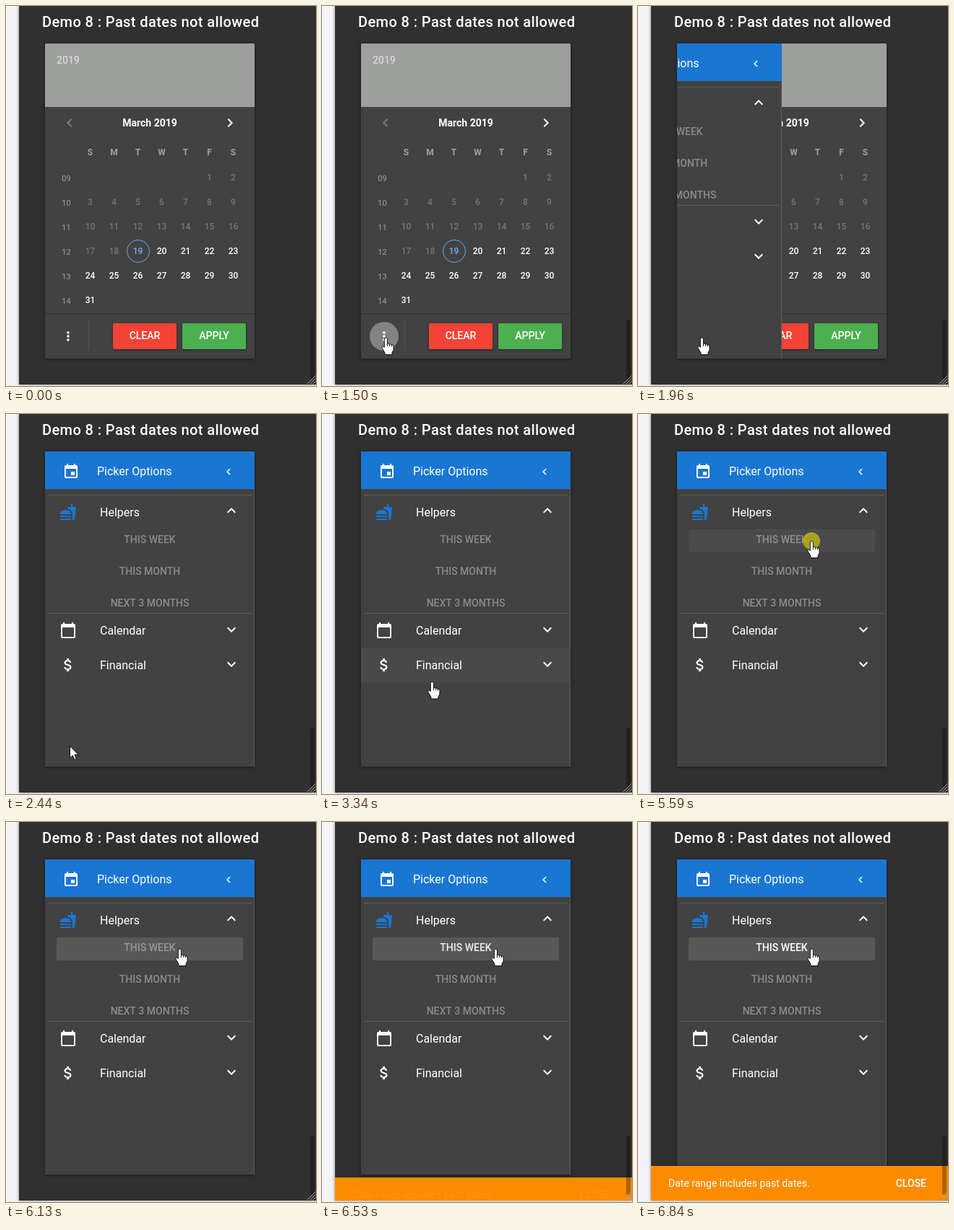
An HTML page with a canvas for the animation above (8 s loop, 429 by 527 pixels).

```html
<!DOCTYPE html>
<html lang="en">
<head>
<meta charset="utf-8">
<title>Date picker demo</title>
<style>
  html, body { margin: 0; width: 100%; height: 100%; overflow: hidden; background: #f4f4f7; }
  canvas { display: block; }
</style>
</head>
<body>
<canvas id="stage" width="429" height="527"></canvas>
<script>
const ctx = document.getElementById('stage').getContext('2d');
const LOOP = 8000;
const CARD = '#424242';

const icons = {
  left: 'M15.41 16.59L10.83 12l4.58-4.59L14 6l-6 6 6 6z',
  right: 'M8.59 16.59L13.17 12 8.59 7.41 10 6l6 6-6 6z',
  up: 'M12 8l-6 6 1.41 1.41L12 10.83l4.59 4.58L18 14z',
  down: 'M16.59 8.59L12 13.17 7.41 8.59 6 10l6 6 6-6z',
  event: 'M17 12h-5v5h5zM16 1v2H8V1H6v2H5a2 2 0 0 0-2 2v14a2 2 0 0 0 2 2h14a2 2 0 0 0 2-2V5a2 2 0 0 0-2-2h-1V1zm3 18H5V8h14z',
  calendar: 'M20 3h-1V1h-2v2H7V1H5v2H4a2 2 0 0 0-2 2v16a2 2 0 0 0 2 2h16a2 2 0 0 0 2-2V5a2 2 0 0 0-2-2zm0 18H4V8h16z',
  food: 'M18.06 23h1.66c.84 0 1.53-.64 1.63-1.46L23 5.05h-5V1h-1.97v4.05h-4.97l.3 2.34c1.71.47 3.31 1.32 4.27 2.26 1.44 1.42 2.43 2.89 2.43 5.29zM1 22v-1h15.03v1a1 1 0 0 1-1 1H2a1 1 0 0 1-1-1zm15.03-7C16.03 7 1 7 1 15zM1 17h15v2H1z',
  dollar: 'M11.8 10.9c-2.27-.59-3-1.2-3-2.15 0-1.09 1.01-1.85 2.7-1.85 1.78 0 2.44.85 2.5 2.1h2.21c-.07-1.72-1.12-3.3-3.21-3.81V3h-3v2.16c-1.94.42-3.5 1.68-3.5 3.61 0 2.31 1.91 3.46 4.7 4.13 2.5.6 3 1.48 3 2.41 0 .69-.49 1.79-2.7 1.79-2.06 0-2.87-.92-2.98-2.1h-2.2c.12 2.19 1.76 3.42 3.68 3.83V21h3v-2.15c1.95-.37 3.5-1.5 3.5-3.55 0-2.84-2.43-3.81-4.7-4.4z'
};
for (const name in icons) icons[name] = new Path2D(icons[name]);

const arrow = new Path2D('M.5 .5V17L4.2 13.5 6.7 19.4 9.3 18.3 6.8 12.5H12Z');
const hand = new Path2D('M-1.7 2Q-1.7 0 .3 0 2.4 0 2.4 2V8.5Q4 7.5 5.4 9 7 8.2 8.2 9.8 11 9.3 11 12V17L9 20.5V23.5H-1V21L-4.8 14.5Q-5.8 12.5-4.5 12-3.3 11.5-1.7 13.5Z');
const knuckles = new Path2D('M2.4 8.5V12M5.4 9V12M8.2 9.8V12.5');

const white = alpha => `rgba(255,255,255,${alpha})`;
const lerp = (a, b, p) => a + (b - a) * p;

// Progress that advances in `count` equal jumps, the first at `from` and the last at `to`.
function stepped(t, from, to, count) {
  if (t < from) return 0;
  const step = Math.floor((t - from) / (to - from) * (count - 1) + 0.12);
  return Math.min(1, (step + 1) / count);
}

function rect(x, y, w, h, color, radius = 0) {
  ctx.fillStyle = color;
  ctx.beginPath();
  ctx.roundRect(x, y, w, h, radius);
  ctx.fill();
}

function circle(x, y, r, color) {
  ctx.fillStyle = color;
  ctx.beginPath();
  ctx.arc(x, y, r, 0, 2 * Math.PI);
  ctx.fill();
}

function text(str, x, y, size, { weight = 400, color = '#fff', align = 'left', spacing = 0 } = {}) {
  ctx.font = `${weight} ${size}px Roboto, sans-serif`;
  ctx.letterSpacing = spacing + 'px';
  ctx.textAlign = align;
  ctx.fillStyle = color;
  ctx.fillText(str, x, y);
}

function icon(name, x, y, color = '#fff', size = 24) {
  ctx.save();
  ctx.translate(x - size / 2, y - size / 2);
  ctx.scale(size / 24, size / 24);
  ctx.fillStyle = color;
  ctx.fill(icons[name]);
  ctx.restore();
}

function shadowed(dy, blur, draw) {
  ctx.save();
  ctx.shadowColor = 'rgba(0,0,0,.5)';
  ctx.shadowOffsetY = dy;
  ctx.shadowBlur = blur;
  draw();
  ctx.restore();
}

function drawPage() {
  rect(0, 0, 429, 527, '#f4f4f7');
  shadowed(0, 4, () => rect(18, 0, 411, 525, '#303031'));
  text('Demo 8 : Past dates not allowed', 50, 29, 20, { weight: 500, spacing: 0.4 });
  shadowed(1, 4, () => rect(54, 52, 290, 437, CARD, 2));
}

function drawCalendar(t) {
  rect(54, 52, 290, 88, '#9d9f9d', [2, 2, 0, 0]);
  text('2019', 70, 80, 14, { weight: 500, color: white(0.6) });
  icon('left', 88, 162, white(0.3));
  icon('right', 310, 162);
  text('March 2019', 199, 167, 14, { weight: 700, align: 'center' });

  const columnX = i => 116.5 + 33 * i;
  [...'SMTWTFS'].forEach((day, i) =>
    text(day, columnX(i), 207, 12, { weight: 700, color: white(0.5), align: 'center' }));
  for (let row = 0; row < 6; row++) {
    const week = String(9 + row).padStart(2, '0');
    text(week, 83.5, 243 + 34 * row, 11, { color: white(0.5), align: 'center' });
  }
  for (let day = 1; day <= 31; day++) {
    const cell = day + 4;
    const color = day < 19 ? white(0.27) : day === 19 ? '#6fb1f5' : '#fff';
    text(day, columnX(cell % 7), 242 + 34 * Math.floor(cell / 7), 12, { weight: 500, color, align: 'center' });
  }
  ctx.strokeStyle = '#64a9ee';
  ctx.lineWidth = 1;
  ctx.beginPath();
  ctx.arc(183, 340, 15.5, 0, 2 * Math.PI);
  ctx.stroke();

  rect(54, 426, 290, 1, '#363636');
  rect(54, 427, 290, 1, '#393939');
  if (t >= 955) circle(86, 458, 20, white(t < 1500 ? 0.05 : t < 1660 ? 0.34 : 0.2));
  for (const y of [453, 458, 463]) circle(86, y, 1.8, '#fff');
  rect(114, 437, 1, 40, '#5c5048');
  const button = (label, x, color) => {
    shadowed(1, 3, () => rect(x, 440, 88, 36, color, 2));
    text(label, x + 44, 462, 14, { weight: 500, align: 'center' });
  };
  button('CLEAR', 148, '#f44336');
  button('APPLY', 244, '#4caf50');
}

function drawHelper(label, y, hover, t) {
  const pressed = y === 160 && t >= 5680;
  if (pressed && t >= 6130) {
    rect(70, y, 258, 32, '#585858', 2);
  } else if (hover) {
    rect(70, y, 258, 32, '#4b4b4b', 2);
    if (pressed) {
      ctx.save();
      ctx.beginPath();
      ctx.rect(70, y, 258, 32);
      ctx.clip();
      circle(221, 176, 81, '#5a5a5a');
      ctx.restore();
    }
  }
  const alpha = pressed && t >= 6460 ? (t < 6600 ? 0.9 : 1) : 0.38;
  text(label, 199, y + 19, 14, { weight: 500, color: white(alpha), align: 'center' });
}

function drawMenu(t, cursor) {
  const p = stepped(t, 1810, 2210, 6);
  if (!p) return;
  ctx.save();
  ctx.beginPath();
  ctx.rect(54, 52, 290, 437);
  ctx.clip();
  ctx.translate(-290 * (1 - p * p * (3 - 2 * p)), 0);
  rect(54, 52, 290, 437, CARD);
  rect(343, 104, 1, 385, '#5c5c5c');
  rect(54, 52, 290, 52, '#1976d2');
  icon('event', 90, 80);
  text('Picker Options', 126, 85, 16);
  icon('left', 308, 80, '#fff', 18);

  icon('food', 86, 136, '#1976d2');
  text('Helpers', 130, 142, 16);
  icon('up', 312, 134);
  ['THIS WEEK', 'THIS MONTH', 'NEXT 3 MONTHS'].forEach((label, i) => {
    const y = 160 + 44 * i;
    const hoverY = t >= 4130 && t < 4580 ? 255 : cursor.y;
    drawHelper(label, y, t > 3030 && hoverY >= y && hoverY < y + 32, t);
  });
  [['calendar', 'Calendar', 276], ['dollar', 'Financial', 324]].forEach(([name, label, y]) => {
    if (t > 3030 && cursor.y >= y && cursor.y < y + 48) rect(54, y, 289, 48, white(0.04));
    icon(name, 86, y + 24);
    text(label, 130, y + 30, 16);
    icon('down', 312, y + 23);
  });
  rect(58, 112, 282, 1, '#5e5e5e');
  rect(58, 276, 282, 1, '#5e5e5e');
  ctx.restore();
}

function drawSnackbar(t) {
  const p = stepped(t, 6460, 6840, 6);
  if (!p) return;
  const y = 477 + 48 * (1 - p) ** 2.71;
  ctx.save();
  ctx.beginPath();
  ctx.rect(18, 0, 411, 525);
  ctx.clip();
  shadowed(1, 4, () => rect(18, y, 411, 48, '#fb8c00'));
  ctx.globalAlpha = Math.max(0, (p - 0.28) / 0.72);
  text('Date range includes past dates.', 42, y + 29, 14);
  text('CLOSE', 399, y + 29, 14, { weight: 500, align: 'right' });
  ctx.restore();
}

function drawScrollbar() {
  rect(421, 435, 6, 82, 'rgba(0,0,0,.3)', 2);
  ctx.strokeStyle = '#a0a0a0';
  ctx.lineWidth = 1;
  for (const size of [4, 8, 12]) {
    ctx.beginPath();
    ctx.moveTo(428.5 - size, 524.5);
    ctx.lineTo(428.5, 524.5 - size);
    ctx.stroke();
  }
}

function cursorAt(t) {
  const move = (from, to, p) => ({ x: lerp(from.x, to.x, p), y: lerp(from.y, to.y, p) });
  const entry = { x: 44, y: 472 }, dots = { x: 88, y: 460 }, months = { x: 236, y: 255 };
  const gap = { x: 236, y: 233 }, week = { x: 240, y: 176 };
  if (t < 3030) return move(entry, dots, stepped(t, 660, 1030, 6));
  if (t < 4130) {
    const p = stepped(t, 3030, 3810, 11);
    return move(dots, months, p * p * (3 - 2 * p));
  }
  return move(gap, week, stepped(t, 4580, 4830, 4));
}

function drawCursor(t, { x, y }) {
  if (t < 660) return;
  if (t >= 5590 && t < 5680) circle(240, 176, 12, 'rgba(184,178,26,.85)');
  const pointing = (t >= 955 && t < 2130) || y < 372;
  const shape = pointing ? hand : arrow;
  ctx.save();
  ctx.translate(x, y);
  ctx.lineJoin = 'round';
  ctx.lineWidth = 1;
  ctx.strokeStyle = '#111';
  ctx.fillStyle = '#fff';
  ctx.fill(shape);
  ctx.stroke(shape);
  if (pointing) ctx.stroke(knuckles);
  ctx.restore();
}

function render(now) {
  const t = now % LOOP;
  const cursor = cursorAt(t);
  drawPage();
  drawCalendar(t);
  drawMenu(t, cursor);
  drawSnackbar(t);
  drawScrollbar();
  drawCursor(t, cursor);
}

const start = performance.now();
function tick() {
  render(performance.now() - start);
  requestAnimationFrame(tick);
}
tick();
</script>
</body>
</html>
```
